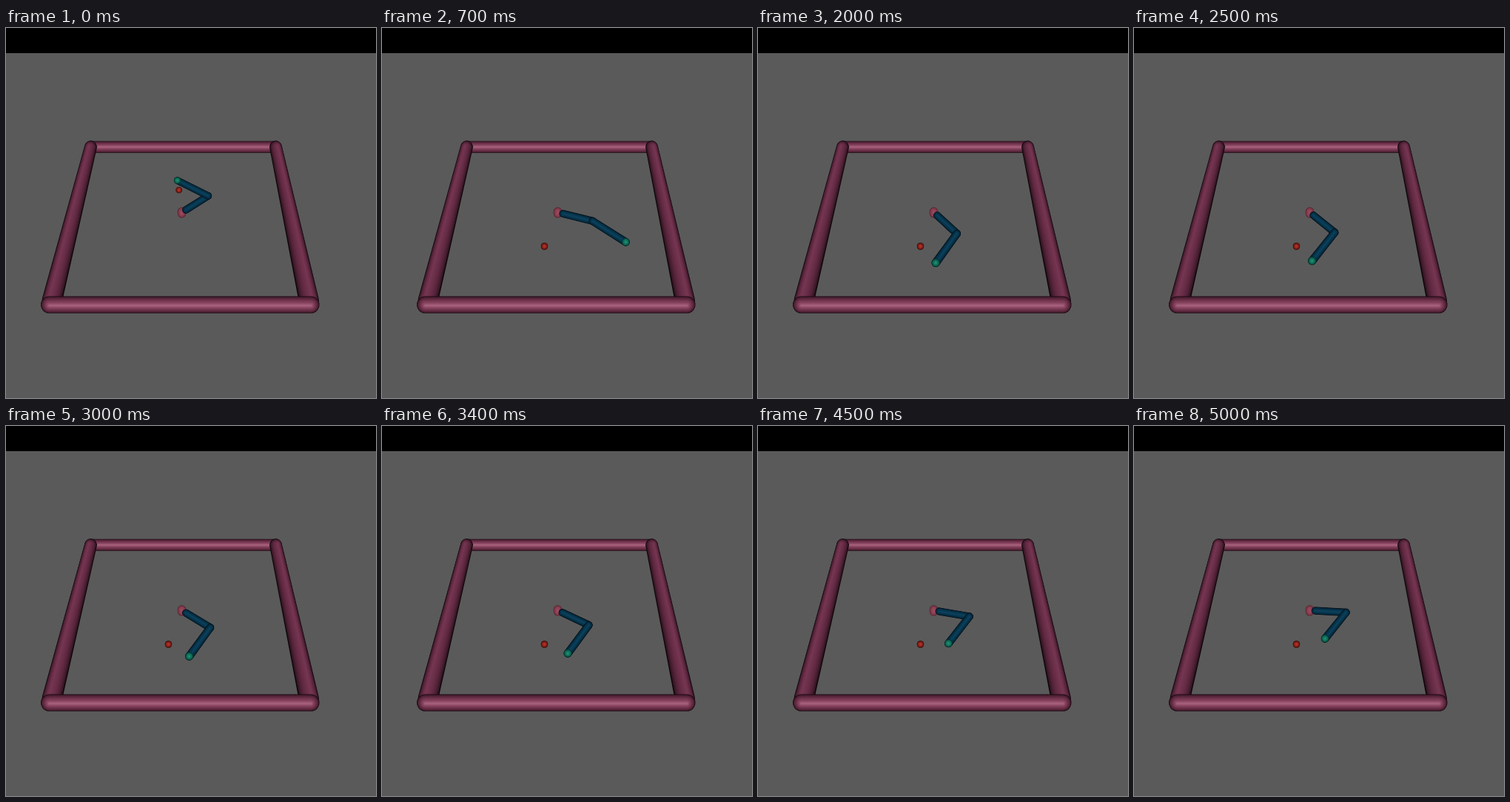
Animation of 500x500 px, one loop 5.1 s. Source, as an HTML page with a canvas:

```html
<!DOCTYPE html>
<html>
<head>
<meta charset="utf-8">
<style>
html, body { margin: 0; height: 100%; overflow: hidden; background: #000; }
canvas { display: block; }
</style>
</head>
<body>
<canvas id="stage" width="500" height="500"></canvas>
<script>
const ctx = document.getElementById('stage').getContext('2d');
const LOOP = 5100, STEP = 100;
const LINK1 = 0.1, LINK2 = 0.112, RADIUS = 0.0103;

// edge colour, body colour, strength of the highlight along the axis
const PINK = [[26, 8, 17], [126, 56, 84], 50];
const PLUM = [[8, 2, 5], [110, 47, 75], 8];
const BLUE = [[0, 8, 14], [7, 58, 84], 8];
const GREEN = [[0, 36, 34], [18, 124, 98], 30];
const RED = [[30, 4, 4], [160, 40, 30], 30];
const ROSE = [[78, 32, 44], [146, 68, 86], 10];

// seconds, first link angle, second link angle (degrees in the floor plane)
const KEYS = [
  [0.1, -1, -1], [0.7, -19.2, -42.1], [1.3, -34.4, -90.2], [2, -51.7, -119.2],
  [3, -40.1, -119.7], [3.9, -24.3, -120.4], [5, -4.4, -121.6]
];

// Floor coordinates in metres to screen pixels
function project([x, y]) {
  const w = 1 + 0.568 * y;
  return { x: (237.6 + 490 * x + 142.3 * y) / w, y: (249.2 - 206.5 * y) / w, r: 490 * RADIUS / w };
}

// Smooth curve through the keys
function angleAt(t, column) {
  let i = 0;
  while (i < KEYS.length - 2 && t >= KEYS[i + 1][0]) i++;
  const slope = k => {
    const a = KEYS[Math.max(k - 1, 0)], b = KEYS[Math.min(k + 1, KEYS.length - 1)];
    return (b[column] - a[column]) / (b[0] - a[0]);
  };
  const [a, b] = [KEYS[i], KEYS[i + 1]], h = b[0] - a[0], u = (t - a[0]) / h, v = 1 - u;
  return v * v * (1 + 2 * u) * a[column] + u * u * (3 - 2 * u) * b[column]
    + h * u * v * (v * slope(i) - u * slope(i + 1));
}

// Round-ended tapered tube, shaded from its edge to a lit line shifted by (lx, ly) radii
function tube(a, b, [edge, body, shine], lx = 0, ly = 0) {
  const dir = Math.atan2(b.y - a.y, b.x - a.x), layers = 16;
  for (let i = 0; i < layers; i++) {
    const d = 1 - i / layers, light = Math.sqrt(1 - d * d), glow = shine * (1 - d) ** 3;
    const end = (p, from, to) =>
      ctx.arc(p.x + lx * p.r * (1 - d), p.y + ly * p.r * (1 - d), p.r * d, dir + from, dir + to);
    ctx.fillStyle = `rgb(${edge.map((c, k) => c + (body[k] - c) * light + glow)})`;
    ctx.beginPath();
    end(a, Math.PI / 2, -Math.PI / 2);
    end(b, -Math.PI / 2, Math.PI / 2);
    ctx.fill();
  }
}

const ball = (p, colors) => tube(p, p, colors);

function drawArena() {
  ctx.fillStyle = '#000';
  ctx.fillRect(0, 0, 500, 34);
  ctx.fillStyle = '#5a5a5a';
  ctx.fillRect(0, 34, 500, 466);
  const backLeft = { x: 114.5, y: 160.7, r: 8 }, backRight = { x: 364.5, y: 160.7, r: 8 };
  const frontLeft = { x: 58.5, y: 374, r: 11.5 }, frontRight = { x: 412, y: 374, r: 11.5 };
  tube(backLeft, backRight, PINK);
  tube({ ...backLeft, r: 8.4 }, { x: 62.3, y: 368, r: 13.6 }, PLUM, -0.35, -0.2);
  tube({ ...backRight, r: 8.4 }, { x: 409.2, y: 368, r: 13.6 }, PLUM, 0.35, -0.2);
  tube(frontLeft, frontRight, PINK, 0, 0.1);
}

function drawArm(first, second) {
  const p = first * Math.PI / 180, q = second * Math.PI / 180;
  const along = (d, e) => [d * Math.cos(p) + e * Math.cos(q), d * Math.sin(p) + e * Math.sin(q)];
  const elbow = project(along(LINK1, 0)), tip = project(along(LINK1, LINK2));
  tube({ x: 237.5, y: 248, r: 5.8 }, { x: 237.5, y: 251, r: 5.6 }, ROSE);
  tube(project(along(0.015, 0)), elbow, BLUE);
  tube(elbow, tip, BLUE);
  ball(tip, GREEN);
}

function draw() {
  const time = Math.floor(performance.now() % LOOP / STEP) * STEP / 1000;
  // The first step still shows the end of the previous episode
  const previous = time < 0.1;
  drawArena();
  ball(previous ? { x: 233.7, y: 219, r: 4.3 } : { x: 219.5, y: 295, r: 4.8 }, RED);
  if (previous) drawArm(41.8, 143.3);
  else drawArm(angleAt(time, 1), angleAt(time, 2));
  requestAnimationFrame(draw);
}
draw();
</script>
</body>
</html>
```
